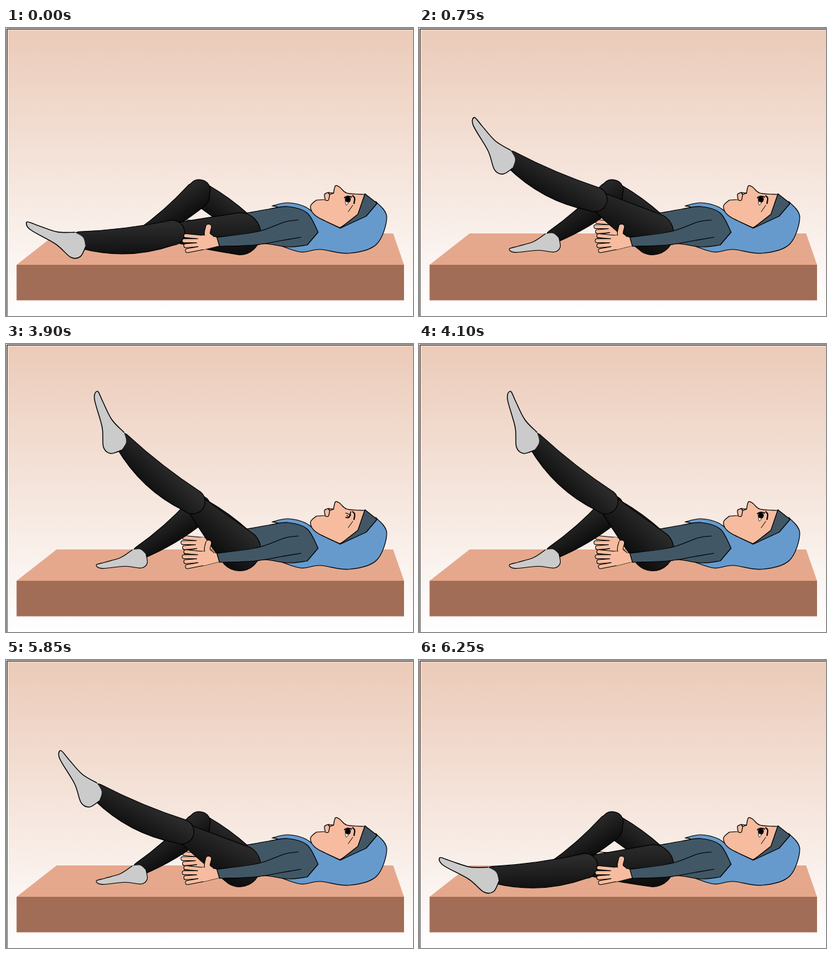
Recreate the animation shown at these times as an HTML page with a canvas. Size 635 by 450 pixels, loop 7.55 s.

```html
<!DOCTYPE html>
<html lang="en">
<head>
<meta charset="utf-8">
<title>Leg raise</title>
<style>
html, body { margin: 0; width: 100%; height: 100%; overflow: hidden; background: #fff; }
canvas { display: block; }
</style>
</head>
<body>
<canvas id="stage" width="635" height="450"></canvas>
<script>
const ctx = document.getElementById('stage').getContext('2d');
const LOOP = 7550, STEP = 50;
const RAD = Math.PI / 180;
const HIP = [364.4, 321.3], TOE = [143, 74];
const SKIN = '#f7bc9f', SLEEVE = '#415766', SCARF = '#669acd', SOCK = '#cbcbcb';
const INK = 1.2;

// Smooth curve through a few key points; "|" marks a corner.
function curve(text) {
  const path = new Path2D();
  text.split('|').forEach((part, n) => {
    const pts = part.trim().split(' ').map(p => p.split(',').map(Number));
    path[n ? 'lineTo' : 'moveTo'](...pts[0]);
    for (let i = 0; i < pts.length - 1; i++) {
      const b = pts[i], c = pts[i + 1], a = pts[i - 1] || b, d = pts[i + 2] || c;
      path.bezierCurveTo(
        b[0] + (c[0] - a[0]) / 6, b[1] + (c[1] - a[1]) / 6,
        c[0] - (d[0] - b[0]) / 6, c[1] - (d[1] - b[1]) / 6, c[0], c[1]);
    }
  });
  return path;
}

// Tapered capsule from a to b whose two sides can swell.
function limb([ax, ay], ra, [bx, by], rb, swellRight = 0, swellLeft = 0) {
  const dir = Math.atan2(by - ay, bx - ax), quarter = Math.PI / 2;
  const nx = -Math.sin(dir), ny = Math.cos(dir);
  const path = new Path2D();
  const side = (sign, swell, x, y, r) => {
    const out = sign * ((ra + rb) / 2 + 2 * swell);
    path.quadraticCurveTo((ax + bx) / 2 + nx * out, (ay + by) / 2 + ny * out,
      x + sign * nx * r, y + sign * ny * r);
  };
  path.arc(ax, ay, ra, dir + quarter, dir + 3 * quarter);
  side(-1, swellLeft, bx, by, rb);
  path.arc(bx, by, rb, dir - quarter, dir + quarter);
  side(1, swellRight, ax, ay, ra);
  return path;
}

function line(path, width = INK, color = '#000') {
  ctx.strokeStyle = color;
  ctx.lineWidth = width;
  ctx.stroke(path);
}

function paint(path, fill, width = INK) {
  ctx.fillStyle = fill;
  ctx.fill(path);
  if (width) line(path, width);
}

function fade(x0, y0, x1, y1, from, to) {
  const g = ctx.createLinearGradient(x0, y0, x1, y1);
  g.addColorStop(0, from);
  g.addColorStop(1, to);
  return g;
}
const cloth = (x0, y0, x1, y1) => fade(x0, y0, x1, y1, '#2b2b2b', '#0e0e0e');

// Draws a part turned and scaled about a pivot, which is moved to a new place.
function placed(pivot, to, angle, scale, drawPart) {
  ctx.save();
  ctx.translate(...to);
  ctx.rotate(angle * RAD);
  ctx.scale(scale, scale);
  ctx.translate(-pivot[0], -pivot[1]);
  drawPart();
  ctx.restore();
}

const sole = '184,138 165,118 151,90 143,74 138,86 150,130 152,161 163,171 180,166';
const foot = {
  fill: curve(sole + ' | 180,166 187.5,153 184,138'),
  edge: curve(sole)
};

const far = {
  thigh: limb([305, 260], 18, [367, 305], 18, 0, 2),
  shank: limb([297, 262], 20, [209, 326], 10, -3, 4),
  knee: limb([301, 252.5], 15, [303, 253], 15)
};

const near = {
  thigh: limb(HIP, 33, [297, 252], 16, 0, 1),
  shank: limb([291, 246], 19.5, [181, 152], 13, -3, 11)
};

const body = {
  scarf: curve('415,278 440,273 468,280 490,297 520,312 | 577,271 594,295 578,338 535,352 490,346 460,350 428,340 | 440,300 425,281 415,278'),
  torso: curve('376,289 410,283 440,279 470,289 487,319 | 470,339 440,342 405,337 388,340 | 372,335 376,289'),
  sleeve: curve('329,327 393,318 | 435,303 455,300 | 460,327 430,332 388,339 333,341'),
  armTop: curve('329,327 393,318 435,303 456,300'),
  armLow: curve('333,341 388,339 430,332 460,327'),
  palm: limb([309, 335], 11, [329, 334], 7),
  thumb: curve('320,328 314,322 316,311')
};

const head = {
  face: curve('560,260 532,258 521,249 514,246.5 511,258 | 503,257 497,260 498,268 | 484,269 475,279 484,294 521,312 | 548,296 560,260'),
  band: curve('560,259 579,274 | 562,294 521,313 | 549,291 560,259'),
  mouth: curve('511,258 505,260 503,257 | 505,260 503,269 498,269'),
  brow: curve('541,262 544,266 543,274'),
  cheek: curve('534,287 541,277'),
  white: curve('529,265 531,277 538,266'),
  lash: curve('528,265 533,263 539,264'),
  lid: curve('530,271 535,271 538,262'),
  lashes: curve('530,264 538,267 | 535,271 532,268')
};

function drawRoom() {
  ctx.fillStyle = fade(0, 0, 0, 450, '#ebcab8', '#ffffff');
  ctx.fillRect(0, 0, 635, 450);
  ctx.fillStyle = '#fff';
  ctx.fillRect(0, 0, 635, 1);
  ctx.fillRect(0, 0, 1, 450);
  ctx.fillStyle = '#000';
  ctx.fillRect(1, 1, 634, 1);
  ctx.fillRect(1, 1, 1, 449);
  ctx.fillStyle = '#e5a88c';
  ctx.fill(new Path2D('M79 321H604L621 370H16.5Z'));
  ctx.fillStyle = '#a26d56';
  ctx.fillRect(16.5, 370, 604.5, 55.5);
}

function drawFoot() {
  paint(foot.fill, SOCK, 0);
  line(foot.edge, 1.4);
}

function drawHand(withThumb) {
  const digit = (path, width) => {
    line(path, width + 2);
    line(path, width, SKIN);
  };
  paint(body.palm, SKIN);
  if (withThumb) digit(body.thumb, 8);
  for (let i = 0; i < 4; i++) {
    const tip = 278 + 2.5 * Math.abs(i - 1);
    digit(curve(`${tip},${324.5 + 7.8 * i} 306,${327 + 5.5 * i}`), 5.2);
  }
  paint(body.palm, SKIN, 0);
}

function drawFarSide() {
  placed([0, 0], [-2, -22], 0, 1, () => drawHand(false));
  paint(far.thigh, cloth(350, 262, 325, 300));
  // Shared outline first, so that no seam shows between knee and shank.
  line(far.knee, 2 * INK);
  line(far.shank, 2 * INK);
  const fill = cloth(244, 268, 268, 306);
  paint(far.knee, fill, 0);
  paint(far.shank, fill, 0);
  placed(TOE, [141, 345], -80, 0.8, drawFoot);
}

function drawNearLeg() {
  paint(near.thigh, cloth(350, 265, 310, 308));
  paint(near.shank, cloth(252, 190, 217, 226));
  drawFoot();
}

function drawHead(blink) {
  paint(head.face, SKIN);
  paint(head.band, SLEEVE);
  line(head.mouth);
  line(head.cheek, 1);
  line(head.brow, 2);
  if (blink) {
    line(head.lid, 1.4);
    line(head.lashes);
    return;
  }
  paint(head.white, '#fff', 0.8);
  ctx.fillStyle = '#000';
  ctx.beginPath();
  ctx.ellipse(533.5, 268, 4.3, 4.6, 0, 0, 2 * Math.PI);
  ctx.fill();
  line(head.lash, 1.8);
}

function drawArm() {
  drawHand(true);
  paint(body.sleeve, SLEEVE, 0);
  line(body.armTop);
  line(body.armLow);
  line(curve('329,327 333,341'));
}

// Leg angle in degrees: 0 is fully raised.
function legAngle(t) {
  const part = (from, steps) =>
    Math.min(1, Math.max(0, Math.floor((t - from) / STEP) + 1) / steps);
  return t < 5700 ? -45 * (1 - part(500, 9)) : -46 * part(5700, 12);
}

const isBlink = t => (t >= 1450 && t < 1600) || (t >= 3900 && t < 4100);

function draw(t) {
  drawRoom();
  drawFarSide();
  paint(body.scarf, SCARF);
  drawHead(isBlink(t));
  paint(body.torso, SLEEVE);
  placed(HIP, HIP, legAngle(t), 1, drawNearLeg);
  drawArm();
}

ctx.lineJoin = ctx.lineCap = 'round';
const start = performance.now();
function tick() {
  draw((performance.now() - start) % LOOP);
  requestAnimationFrame(tick);
}
tick();
</script>
</body>
</html>
```
